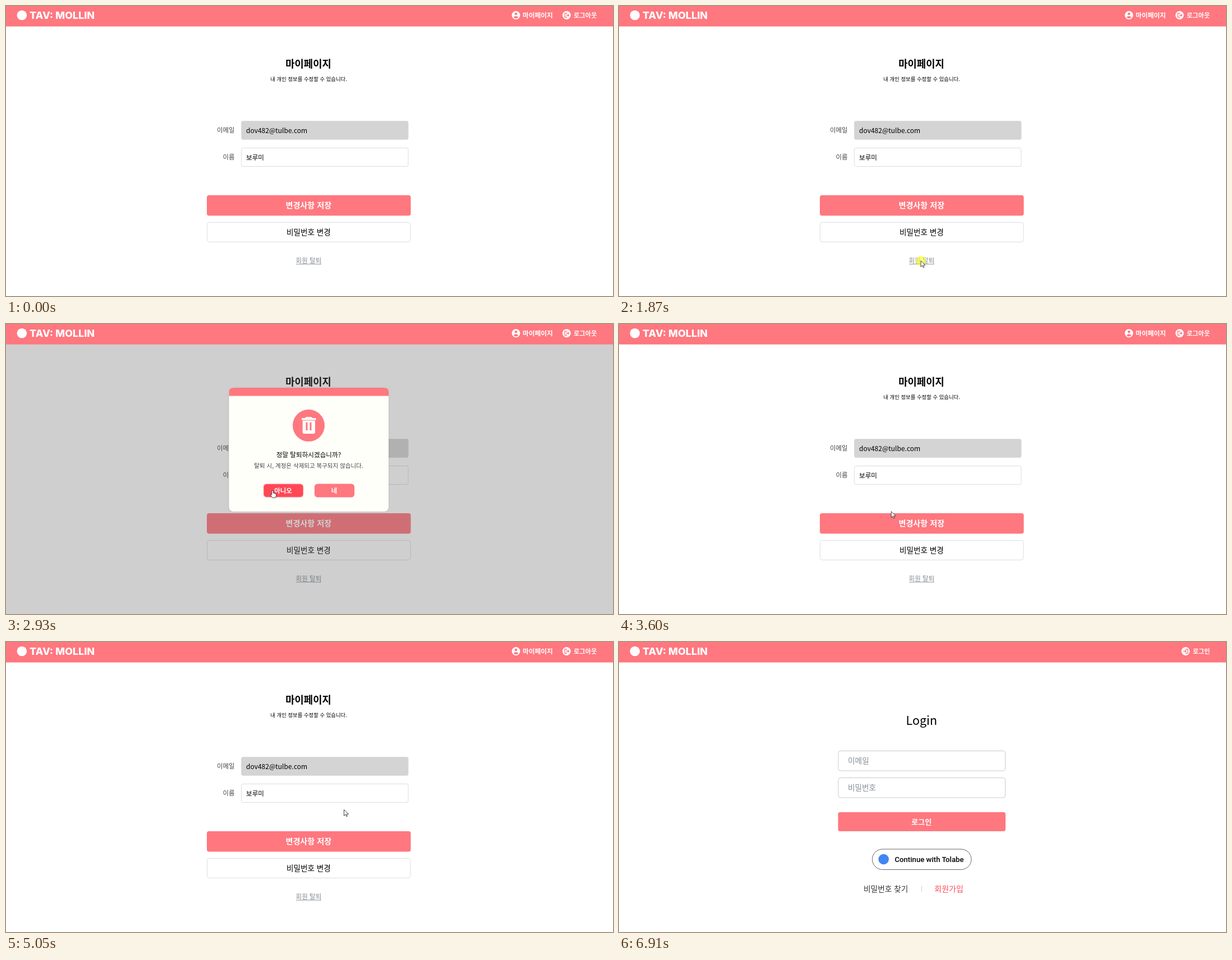
Recreate the animation shown at these times as an HTML page. Size 1082 px wide and 518 px high, loop 7900 ms.

```html
<!DOCTYPE html>
<html lang="ko">
<head>
<meta charset="utf-8">
<title>마이페이지</title>
<style>
  html, body { margin: 0; height: 100%; overflow: hidden; background: #fff; }
  svg { display: block; width: 100vw; height: 100vh; }
  text { font-family: "Noto Sans CJK KR", "Noto Sans CJK", sans-serif; font-weight: 500; }
  .mid { text-anchor: middle; }
  .end { text-anchor: end; }
  .bold { font-weight: 700; }
  .pink { fill: #ff777f; }
  .blue { fill: #62a4f1; }
  .white { fill: #fff; }
  .gray { fill: #444; }
  .hint { fill: #868e96; font-weight: 400; }
  .line { fill: none; stroke: #ff777f; stroke-width: 1.3; }
  .box { fill: #fff; stroke: #dcdde0; }
  .field { fill: #fff; stroke: #c9cbce; }
  .paper { fill: #fffffa; filter: drop-shadow(0 0 1.5px rgba(0, 0, 0, .12)); }
  .btn rect { stroke-width: 1.2; }
  .btn text { font-weight: 700; }
  #no rect { fill: #fffffa; stroke: #ff777f; }
  #no text { fill: #ff777f; }
  #yes rect { fill: #ff777f; stroke: #ff777f; }
  #yes text, .btn.over text { fill: #fff !important; }
  #no.over rect, #yes.over rect { fill: #ff4755; }
  #ok rect { fill: #fffffa; stroke: #62a4f1; }
  #ok text { fill: #62a4f1; }
  #ok.over rect { fill: #62a4f1; }
</style>
</head>
<body>
<svg viewBox="0 0 1082 518" preserveAspectRatio="none">
  <g id="account">
    <text class="mid bold" x="539" y="109.5" font-size="17.7">마이페이지</text>
    <text class="mid" x="539.5" y="134" font-size="9.4">내 개인 정보를 수정할 수 있습니다.</text>
    <text class="end gray" x="407.5" y="226" font-size="11.4">이메일</text>
    <rect class="box" x="419.5" y="205.5" width="297.5" height="33" rx="3" style="fill:#d4d4d4"/>
    <text x="428" y="226.5" font-size="12">dov482@tulbe.com</text>
    <text class="end gray" x="407.5" y="274.3" font-size="11.4">이름</text>
    <rect class="box" x="419.5" y="253.5" width="297.5" height="33" rx="3"/>
    <text x="428" y="274.5" font-size="11.6">보루미</text>
    <rect class="pink" x="358" y="338" width="363.5" height="36.5" rx="4"/>
    <text class="mid white bold" x="539.3" y="361.2" font-size="14.1">변경사항 저장</text>
    <rect class="box" x="358.5" y="386.5" width="362.5" height="35" rx="4"/>
    <text class="mid" x="539.3" y="409" font-size="13.6">비밀번호 변경</text>
    <text class="mid hint" x="539.5" y="458.8" font-size="11.6">회원 탈퇴</text>
    <path d="M517 461H562" stroke="#868e96"/>
  </g>

  <g id="login">
    <text class="mid" x="539.3" y="148" font-size="21.5">Login</text>
    <rect class="field" x="391" y="194.5" width="297.5" height="35.5" rx="4"/>
    <text class="hint" x="408" y="217.2" font-size="13.7">이메일</text>
    <rect class="field" x="391" y="242.5" width="297.5" height="35.5" rx="4"/>
    <text class="hint" x="408" y="265.2" font-size="13.6">비밀번호</text>
    <rect class="pink" x="390.5" y="304" width="298.5" height="34" rx="3.5"/>
    <text class="mid white bold" x="539.3" y="326" font-size="13">로그인</text>
    <rect x="451.5" y="370" width="176.5" height="36.5" rx="18.2" fill="#fff" stroke="#666"/>
    <circle cx="471.7" cy="388" r="9.3" fill="#4285f4"/>
    <text class="mid" x="553" y="392.7" font-size="13.2" style="font-family:Roboto,sans-serif">Continue with Tolabe</text>
    <text x="436" y="446" font-size="13.7" fill="#333">비밀번호 찾기</text>
    <path d="M539.5 436V446" stroke="#ccc"/>
    <text x="562.3" y="446" font-size="14" fill="#ff4f5a">회원가입</text>
  </g>

  <rect id="shade" y="36" width="1082" height="482" fill="#5c5c5c" opacity=".294"/>

  <rect class="pink" width="1082" height="36.5"/>
  <circle class="white" cx="28.3" cy="16.5" r="8.8"/>
  <text class="white" x="42" y="23" font-size="18" style="font-family:Inter,sans-serif;font-weight:800">TAV: MOLLIN</text>
  <g id="member">
    <circle class="white" cx="909" cy="16.5" r="7.4"/>
    <circle class="pink" cx="909" cy="14" r="2.3"/>
    <path class="pink" d="M904.5 20Q909 16 913.5 20Q909 24.5 904.5 20Z"/>
    <text class="white bold" x="921" y="20.8" font-size="11.7">마이페이지</text>
    <circle class="white" cx="999.3" cy="16.5" r="7.4"/>
    <path class="line" d="M1000 13H996V20H1000M998.5 16.5H1003.5M1001.5 14.5L1003.5 16.5L1001.5 18.5"/>
    <text class="white bold" x="1012" y="20.8" font-size="11.2">로그아웃</text>
  </g>
  <g id="guest">
    <circle class="white" cx="1010" cy="16.5" r="7.4"/>
    <path class="line" d="M1010 13H1014V20H1010M1005.5 16.5H1011M1009 14.5L1011 16.5L1009 18.5"/>
    <text class="white bold" x="1023" y="20.8" font-size="11">로그인</text>
  </g>

  <g id="confirm">
    <rect class="paper" x="397.5" y="114" width="284.5" height="221" rx="8"/>
    <path class="pink" d="M397.5 128.5V122Q397.5 114 405.5 114H674Q682 114 682 122V128.5Z"/>
    <circle class="pink" cx="539.5" cy="181.3" r="28.5"/>
    <path class="white" d="M527 168H533L535 166H544L546 168H552.5V171.5H527ZM528.7 172.5H551V193Q551 196 548 196H531.7Q528.7 196 528.7 193Z"/>
    <path class="pink" d="M534.5 175.5H537.5V190H534.5ZM541.5 175.5H544.5V190H541.5Z"/>
    <text class="mid" x="539.5" y="238" font-size="11.6">정말 탈퇴하시겠습니까?</text>
    <text class="mid gray" x="539.5" y="257.2" font-size="10.5">탈퇴 시, 계정은 삭제되고 복구되지 않습니다.</text>
    <g id="no" class="btn">
      <rect x="459.5" y="286" width="70" height="23" rx="5"/>
      <text class="mid" x="494" y="301.7" font-size="11.5">아니오</text>
    </g>
    <g id="yes" class="btn">
      <rect x="550.5" y="286" width="70" height="23" rx="5"/>
      <text class="mid" x="585" y="301.7" font-size="11.5">네</text>
    </g>
  </g>

  <g id="done">
    <rect class="paper" x="400.5" y="114" width="284" height="221" rx="8"/>
    <path class="blue" d="M400.5 128.5V122Q400.5 114 408.5 114H676.5Q684.5 114 684.5 122V128.5Z"/>
    <circle class="blue" cx="542.5" cy="191.5" r="28.5"/>
    <path d="M527 193L537 202.5L560 181" fill="none" stroke="#fff" stroke-width="3" stroke-linecap="round" stroke-linejoin="round"/>
    <text class="mid" x="542.5" y="248.2" font-size="11.6">회원 정보가 삭제되었습니다.</text>
    <g id="ok" class="btn">
      <rect x="507.5" y="276" width="70" height="23.5" rx="5"/>
      <text class="mid" x="542.3" y="291.5" font-size="11">확인</text>
    </g>
  </g>

  <g id="cursor" stroke-linejoin="round">
    <circle id="press" cy=".5" r="9" fill="#ffff1e" opacity=".6"/>
    <path id="arrow" d="M0 0V11L2.6 8.6L4.4 12.3L6 11.6L4.3 8H8Z" fill="#fff" stroke="#333" stroke-width=".9"/>
    <path id="hand" d="M-1.3 1Q0 -.8 1.3 1V4.8L5.3 6Q7 6.6 6.5 9.5L5.5 13.3H-.3L-3.4 8.8Q-3.3 7 -1.3 8.2Z" fill="#fff" stroke="#333" stroke-width=".9"/>
  </g>
</svg>
<script>
const LOOP = 7900;
const $ = id => document.getElementById(id);
const show = (id, on) => $(id).style.display = on ? "" : "none";
const within = (t, spans) => spans.some(([a, b]) => t >= a && t < b);

// start, last step, step count, end x, y, control x, y, easing power
const home = [1110, 520];
const moves = [
  [200, 930, 12, 560, 425, 780, 490, 1.6],
  [1000, 1730, 12, 538, 455, 525, 505, 1],
  [2470, 2930, 8, 475, 297, 582, 350, 1.3],
  [3600, 3930, 6, 519, 449, 500, 390, 1.3],
  [4190, 4390, 4, 556, 316, 535, 370, 1.2],
  [4460, 4720, 5, 602.5, 299.5, 580, 306, 1.3],
  [5450, 5520, 2, 545, 292, 574, 297, 1],
  [6450, 6910, 7, 1092, 506, 800, 390, 0.8]
];
const clicks = [[1870, 1940], [3270, 3340], [4000, 4070], [4990, 5050], [5920, 5990]];
const asking = [[1940, 3340], [4070, 5050]];
const finished = [[5120, 5990]];

function cursorAt(t) {
  let [x, y] = home;
  for (const [start, last, n, ex, ey, cx, cy, power] of moves) {
    if (t < start) break;
    const pace = (last - start) / (n - 1);
    const step = Math.min(n, Math.floor((t - start) / pace + 0.05) + 1);
    const s = 1 - (1 - step / n) ** power;
    const curve = (a, c, b) => (1 - s) ** 2 * a + 2 * s * (1 - s) * c + s * s * b;
    x = curve(x, cx, ex);
    y = curve(y, cy, ey);
  }
  return [x, y];
}

function hover(id, active, x, y) {
  const { x: bx, y: by, width, height } = $(id).firstElementChild;
  const dx = x - bx.baseVal.value, dy = y - by.baseVal.value;
  const over = active && dx >= 0 && dy >= 0 && dx <= width.baseVal.value && dy <= height.baseVal.value;
  $(id).classList.toggle("over", over);
  return over;
}

function draw() {
  const t = performance.now() % LOOP;
  const [x, y] = cursorAt(t);
  const out = t >= 5990;
  const ask = within(t, asking), done = within(t, finished);
  show("account", !out);
  show("member", !out);
  show("login", out);
  show("guest", out);
  show("shade", ask || done);
  show("confirm", ask);
  show("done", done);
  const over = [hover("no", ask, x, y), hover("yes", ask, x, y), hover("ok", done, x, y)].includes(true);
  show("hand", over);
  show("arrow", !over);
  show("press", within(t, clicks));
  $("cursor").setAttribute("transform", `translate(${x} ${y})`);
  requestAnimationFrame(draw);
}
draw();
</script>
</body>
</html>
```
